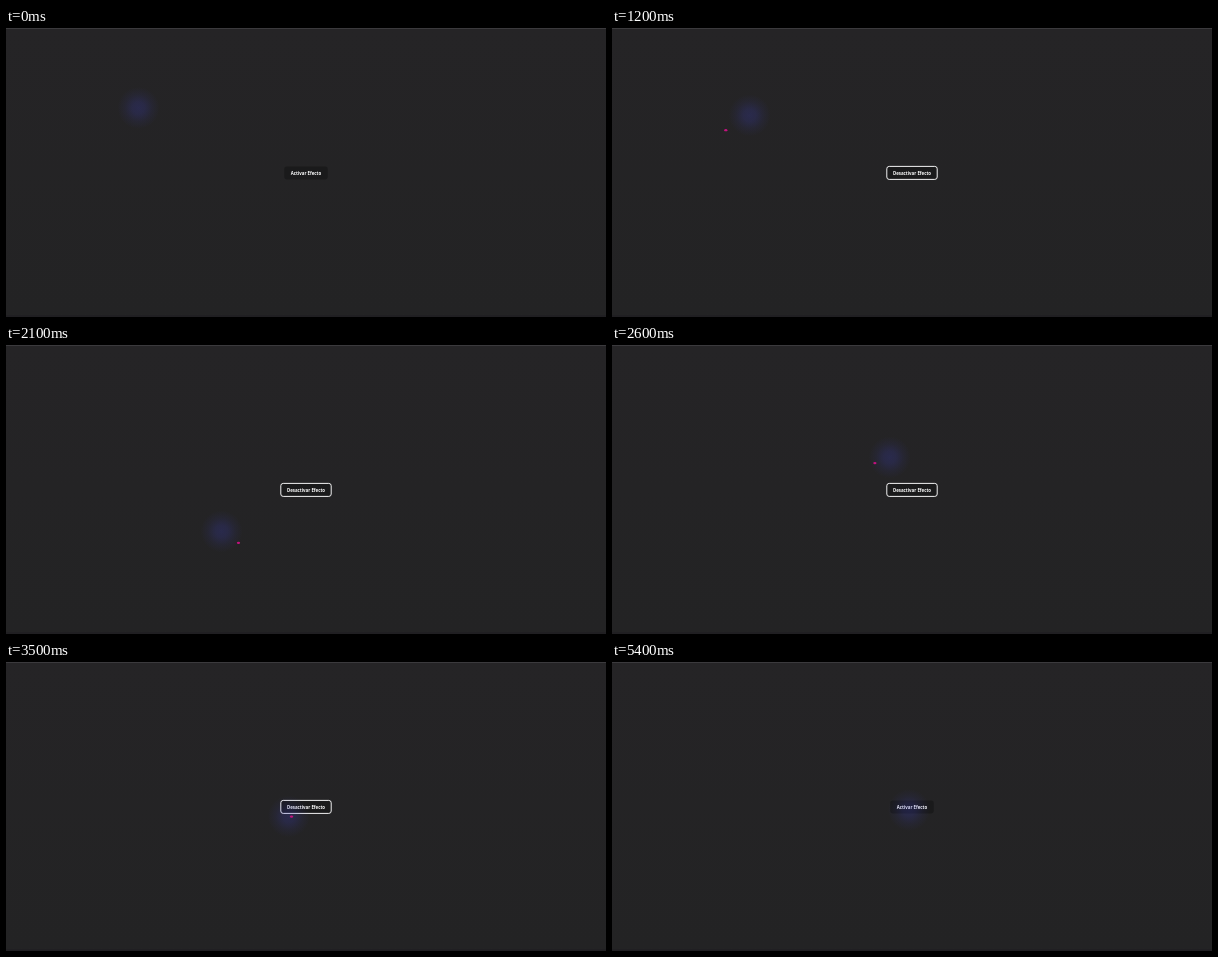
An HTML page that plays this animation: 600 by 289 pixels, repeating every 5500 ms.

```html
<!DOCTYPE html>
<html lang="es">
<head>
<meta charset="utf-8">
<title>Efecto de puntero</title>
<style>
html, body { margin: 0; width: 100%; height: 100%; overflow: hidden; background: #242325; }
svg { display: block; width: 100%; height: 100%; }
text { font: 700 4.4px "Open Sans", "Noto Sans", sans-serif; fill: #fff; text-anchor: middle; }
</style>
</head>
<body>
<svg viewBox="0 0 600 289">
  <defs>
    <linearGradient id="bg" x2="0" y2="1">
      <stop offset="0" stop-color="#252426"/>
      <stop offset="1" stop-color="#232324"/>
    </linearGradient>
    <radialGradient id="glow">
      <stop offset="0" stop-color="#3c40c8" stop-opacity=".24"/>
      <stop offset=".3" stop-color="#3c40c8" stop-opacity=".2"/>
      <stop offset=".65" stop-color="#3c40c8" stop-opacity=".08"/>
      <stop offset="1" stop-color="#3c40c8" stop-opacity="0"/>
    </radialGradient>
  </defs>
  <rect width="600" height="289" fill="url(#bg)"/>
  <rect width="600" height="1" fill="#3b3a3d"/>
  <rect y="287" width="600" height="2" fill="#201f22"/>
  <rect id="button" y="138.4" height="13" rx="2.4" fill="#1a1a1b"/>
  <text id="label" x="300" y="146.7"></text>
  <circle id="blob" r="21" fill="url(#glow)"/>
  <g id="cursor">
    <path id="finger" d="M-.2-4.2h2.2v4h-2.2z" fill="#1a1a1b"/>
    <ellipse id="dot" fill="#c4127f"/>
  </g>
</svg>
<script>
const LOOP = 5500, STEP = 100, LEAD = 25;
const FOCUS = 700, CLICK = 900, FOLLOW = 1000, STOP = 3800, GONE = 4300, BLUR = 5400;
const REST = { x: 132.5, y: 80 };

// Key points: time, x, y
const enter = [[100, 572, 232], [500, 238, 158], [700, 285, 149], [900, 288, 148]];
const centre = [[1500, 230, 166], [2100, 305, 144], [3000, 292, 173], [3600, 297, 148]];
const leave = [[3800, 299, 148], [4200, 472, 189.5]];

const $ = id => document.getElementById(id);
const clamp = v => Math.max(0, Math.min(1, v));
const smooth = p => p * p * (3 - 2 * p);
const linear = p => p;

function along(keys, t, ease) {
  let i = 0;
  while (i < keys.length - 2 && t > keys[i + 1][0]) i++;
  const [t0, x0, y0] = keys[i], [t1, x1, y1] = keys[i + 1];
  const p = ease(clamp((t - t0) / (t1 - t0)));
  return { x: x0 + (x1 - x0) * p, y: y0 + (y1 - y0) * p };
}

// Counter-clockwise spiral that opens after the click and closes on the button
function spiral(t) {
  const u = (t - 1500) / 1000;
  const size = clamp((t - CLICK) / 300) * clamp(1 - u / 2.2);
  const angle = 1.45 - 8.7 * u;
  const c = along(centre, t, linear);
  return { x: c.x + 152 * size * Math.cos(angle), y: c.y + 99 * size * Math.sin(angle) };
}

function cursorAt(t) {
  if (t < FOLLOW) return along(enter, t, smooth);
  return t < STOP ? spiral(t + LEAD) : along(leave, t, smooth);
}

function set(el, attrs) {
  for (const key in attrs) el.setAttribute(key, attrs[key]);
}

const move = (el, { x, y }) => set(el, { transform: `translate(${x} ${y})` });

function draw(time) {
  const t = Math.floor(time / STEP) * STEP;
  const active = t >= CLICK && t < STOP;
  const focused = t >= FOCUS && t < BLUR;
  const width = active ? 50.4 : 43.4;

  set($("button"), {
    x: 300 - width / 2, width,
    stroke: focused ? "#f2f2f3" : "none", "stroke-width": 1
  });
  $("label").textContent = active ? "Desactivar Efecto" : "Activar Efecto";
  move($("blob"), t < FOLLOW ? REST : spiral(Math.min(t, STOP)));

  const pos = cursorAt(t);
  const hover = focused && Math.abs(pos.x - 300) < width / 2 && Math.abs(pos.y - 145) < 7;
  move($("cursor"), pos);
  set($("cursor"), { visibility: t >= 100 && t < GONE ? "visible" : "hidden" });
  set($("finger"), { opacity: hover ? 1 : 0 });
  set($("dot"), hover ? { rx: 2.5, ry: 1.8 } : { rx: 1.6, ry: 1.2 });
}

const start = performance.now();
function tick() {
  draw((performance.now() - start) % LOOP);
  requestAnimationFrame(tick);
}
tick();
</script>
</body>
</html>
```
